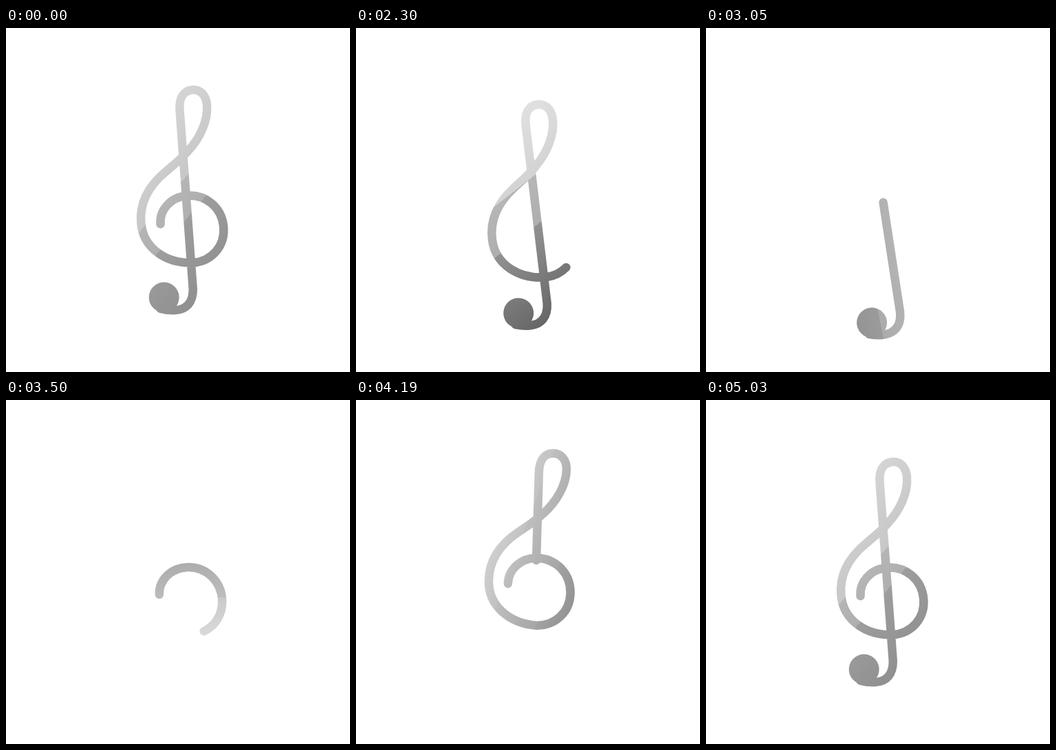
Animation, 500 px wide and 500 px high, one loop 5.06 s. Source, as an HTML page:

```html
<!DOCTYPE html>
<html lang="en">
<head>
<meta charset="utf-8">
<title>Treble clef</title>
<style>
  html, body { margin: 0; width: 100%; height: 100%; overflow: hidden; background: #fff; }
  svg { display: block; width: 100%; height: 100%; }
  path { fill: none; stroke: url(#shade); stroke-width: 12.5; stroke-linecap: round; stroke-linejoin: round; }
  circle { fill: url(#shade); }
</style>
</head>
<body>
<svg viewBox="0 0 500 500">
  <defs>
    <linearGradient id="shade" gradientUnits="userSpaceOnUse" x1="130" y1="255" x2="480" y2="255"></linearGradient>
  </defs>
  <g id="clef">
    <path id="leaving" pathLength="1"/>
    <path id="arriving" pathLength="1"/>
    <circle id="ball" cx="217.5" cy="380.5" r="22"/>
  </g>
</svg>
<script>
const LOOP = 5060, HOLD = 2000, STEP = 30, STEPS = 101;
const OUT_END = 0.46, IN_START = 0.4;
const CURVE = `M221.5 274 C221.5 254 239 236 263 236
  C291 236 312.5 258 312.5 286 C312.5 314 291 334 264 334
  C225 332 193.5 307 193.5 270 C193.5 235 215 213 235 199
  C249 189 259 183 270 172 C290 154 303.5 129 303.5 107
  C303.5 92 295 83.5 284 83.5 C272 83.5 263.5 93 263.5 112
  L260.5 372 C259 392 248 400.5 233 400.5 C225 400.5 218 399 211 396.5`;

// Keys are [progress, value] pairs.
const dropKeys = [[0, 7.5], [.178, 53], [.235, 57], [.3465, 42], [.535, -1.5], [.624, -12], [.72, -6.5], [.802, 0], [1, 7.5]];
const tiltKeys = [[0, -4.9], [.178, -10.3], [.25, -10.6], [.3465, -9.4], [.47, -3.5], [.535, -.3], [.624, 1.5], [.802, 0], [1, -4.9]];
const outKeys = [[0, 0], [.178, .43], [.3465, .754], [OUT_END, 1]];
const inKeys = [[IN_START, 0], [.535, .3], [.624, .51], [.8, 1]];
const ballKeys = [[0, 22], [.38, 22], [.45, 0], [.805, 0], [.88, 22]];

// Shading: band edge, jump at the edge, slope of the light and dark sides.
const shadeAt = [0, .178, .3465, .624, .802, 1];
const shadeKeys = [
  [20, 37, 36, 36, 30, 20],
  [18, 37, 16, 10, 0, 18],
  [.15, .14, .2, .38, .35, .15],
  [.15, .52, .2, .38, .38, .15]
].map(row => row.map((v, i) => [shadeAt[i], v]));

const $ = id => document.getElementById(id);
const clamp = v => Math.max(0, Math.min(1, v));

function segment(keys, p) {
  let i = 0;
  while (i < keys.length - 2 && p > keys[i + 1][0]) i++;
  const u = clamp((p - keys[i][0]) / (keys[i + 1][0] - keys[i][0]));
  return [i, u];
}

function linear(keys, p) {
  const [i, u] = segment(keys, p);
  return keys[i][1] + (keys[i + 1][1] - keys[i][1]) * u;
}

// Cubic curve through the keys, at rest at both ends.
function smooth(keys, p) {
  const [i, u] = segment(keys, p);
  const slope = n => n > 0 && n < keys.length - 1
    ? (keys[n + 1][1] - keys[n - 1][1]) / (keys[n + 1][0] - keys[n - 1][0]) : 0;
  const [x0, a] = keys[i], [x1, b] = keys[i + 1];
  const w = x1 - x0, u2 = u * u, u3 = u2 * u;
  return a * (2 * u3 - 3 * u2 + 1) + b * (3 * u2 - 2 * u3)
    + w * (slope(i) * (u3 - 2 * u2 + u) + slope(i + 1) * (u3 - u2));
}

function showPart(path, from, to) {
  const length = to - from;
  path.style.display = length > 0.002 ? "" : "none";
  path.setAttribute("stroke-dasharray", `${Math.max(length, 0)} 2`);
  path.setAttribute("stroke-dashoffset", -from);
}

const stops = Array.from({ length: 6 }, () =>
  $("shade").appendChild(document.createElementNS("http://www.w3.org/2000/svg", "stop")));

function paintShade(p) {
  const [edge, jump, light, dark] = shadeKeys.map(keys => linear(keys, p));
  const mid = 178, low = mid - light * edge - jump;
  const tones = [
    [-125, mid + light * 125 + jump],
    [-edge, mid + light * edge + jump],
    [-edge, mid + light * edge],
    [edge, mid - light * edge],
    [edge, low],
    [225, low - dark * (225 - edge)]
  ];
  tones.forEach(([d, tone], i) => {
    const g = Math.round(255 * clamp(tone / 255));
    stops[i].setAttribute("offset", (d + 125) / 350);
    stops[i].setAttribute("stop-color", `rgb(${g},${g},${g})`);
  });
}

function draw(p) {
  const drop = smooth(dropKeys, p), tilt = smooth(tiltKeys, p);
  const turn = 40 + 180 * (1 - Math.cos(Math.PI * clamp(p / 0.85)));
  $("clef").setAttribute("transform", `translate(0 ${drop}) rotate(${tilt} 265 240)`);
  // Undo the pose so that the light turns on the stage.
  $("shade").setAttribute("gradientTransform",
    `rotate(${-tilt} 265 240) translate(0 ${-drop}) rotate(${turn} 255 255)`);
  paintShade(p);
  showPart($("leaving"), p < OUT_END ? clamp(smooth(outKeys, p)) : 1, 1);
  showPart($("arriving"), 0, p > IN_START ? clamp(linear(inKeys, p)) : 0);
  $("ball").setAttribute("r", linear(ballKeys, p));
}

$("leaving").setAttribute("d", CURVE);
$("arriving").setAttribute("d", CURVE);

const start = performance.now();
function tick() {
  const t = (performance.now() - start) % LOOP;
  draw(Math.min(STEPS, Math.max(0, Math.floor((t - HOLD) / STEP))) / STEPS);
  requestAnimationFrame(tick);
}
tick();
</script>
</body>
</html>
```
